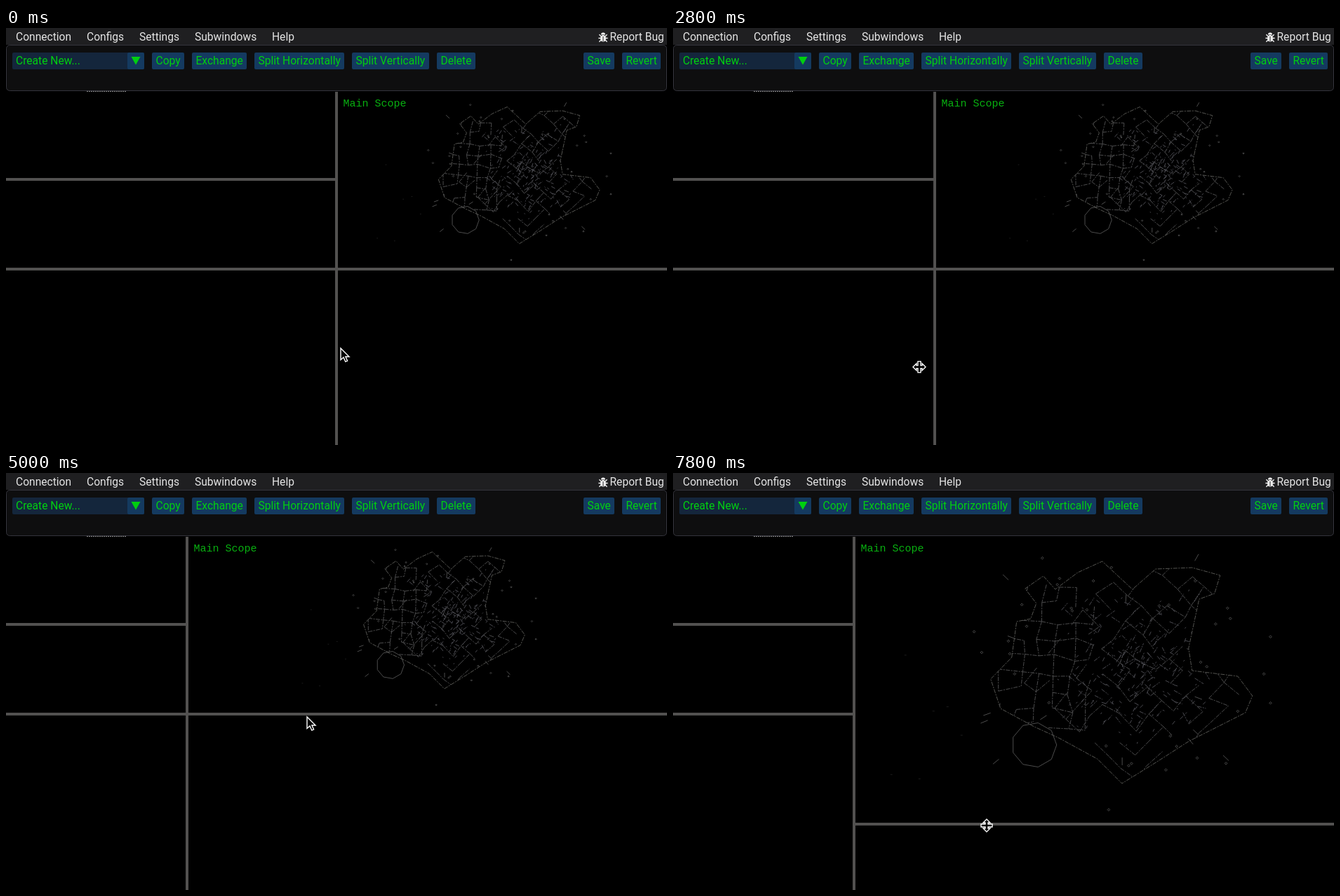
Recreate the animation shown at these times as an HTML page with a canvas. Size 942x595 px, loop 8000 ms.

```html
<!DOCTYPE html>
<html lang="en">
<head>
<meta charset="utf-8">
<title>Split panes</title>
<style>
  html, body { margin: 0; width: 100%; height: 100%; overflow: hidden; background: #000; }
  canvas { display: block; width: 942px; height: 595px; }
</style>
</head>
<body>
<canvas id="stage" width="942" height="595"></canvas>
<script>
const W = 942, H = 595, TOP = 91, LOOP = 8000, STEP = 200;
const ctx = document.getElementById('stage').getContext('2d');
const UI = '15.6px Roboto, sans-serif';
const GREEN = '#00cf10', BAR = '#525150', BUTTON = '#143a60';
const DRAG_X = 2000, DROP_X = 4200, DRAG_Y = 5400;

const clamp = v => Math.min(1, Math.max(0, v));
const ramp = (t, from, to) => clamp((t - from) / (to - from));
const mix = (a, b, p) => a + (b - a) * p;

// Both splitters are dragged at a steady speed
const splitX = t => 471 - 98 * ramp(t, 2170, 2800) - 123.5 * ramp(t, 2800, 3600) + 8 * ramp(t, 3600, DROP_X);
const splitY = t => 344 + 156.5 * ramp(t, 5500, 7800);

// The pointer leads the vertical splitter, crosses over, then rides the horizontal one
function pointer(t) {
  if (t < DRAG_X) {
    const p = ramp(t, 0, 1200), q = ramp(t, 1200, DRAG_X);
    return [477 - 12 * p + 6 * q, 457 + 20 * p + 9 * q];
  }
  if (t < DROP_X) {
    const lead = 22 * ramp(t, DRAG_X, 2400) * (1 - ramp(t, 2800, 3600));
    return [splitX(t) - lead + 2 * ramp(t, 2800, 3600), 486 - 15 * ramp(t, 2650, 3600)];
  }
  const p = ramp(t, DROP_X, 5000);
  if (t < DRAG_Y) return [mix(258, 429, p) + 16 * ramp(t, 5000, DRAG_Y), mix(464, 348, p)];
  return [447, splitY(t) + 2.5];
}

function random(seed) {
  return () => {
    seed = seed + 0x6D2B79F5 | 0;
    let n = Math.imul(seed ^ seed >>> 15, 1 | seed);
    n = n + Math.imul(n ^ n >>> 7, 61 | n) ^ n;
    return ((n ^ n >>> 14) >>> 0) / 4294967296;
  };
}

// Map space: a pane 407.5 high, centred on x = 601
const MAP_X = 601, MAP_H = 407.5, MID_X = 640, MID_Y = 285;
const rnd = random(41);
const spread = size => (rnd() + rnd() - 1) * size;

const outline = new Path2D(
  'M483 263 490 212 510 208 518 186 502 165 528 147 545 166 577 142 612 126 655 166 688 137 740 135 ' +
  '780 146 772 172 750 180 735 250 740 282 805 290 826 318 816 342 735 383 690 412 640 443 605 408 ' +
  '550 378 515 362 467 336 453 294Z');
const streets = new Path2D(), clutter = new Path2D(), marks = new Path2D(), specks = new Path2D();

function segment(path, x, y, angle, length) {
  path.moveTo(x, y);
  path.lineTo(x + Math.cos(angle) * length, y + Math.sin(angle) * length);
}

function polygon(path, x, y, r, sides) {
  for (let i = 0; i < sides; i++) {
    const a = i * 2 * Math.PI / sides;
    path[i ? 'lineTo' : 'moveTo'](x + r * Math.cos(a), y + r * Math.sin(a));
  }
  path.closePath();
}

// A jittered, turned grid of blocks with some street pieces left out
function addGrid(cx, cy, angle, cols, rows, cell, keep) {
  const c = Math.cos(angle), s = Math.sin(angle), above = [];
  for (let j = 0; j < rows; j++) {
    let before = null;
    for (let i = 0; i < cols; i++) {
      const u = (i - (cols - 1) / 2) * cell + spread(7);
      const v = (j - (rows - 1) / 2) * cell + spread(7);
      const node = [cx + u * c - v * s, cy + u * s + v * c];
      for (const other of [before, above[i]]) {
        if (other && rnd() < keep) {
          streets.moveTo(...other);
          streets.lineTo(...node);
        }
      }
      before = above[i] = node;
    }
  }
}
addGrid(533, 262, 0.08, 6, 9, 25, 0.72);
addGrid(690, 285, -0.85, 11, 11, 27, 0.5);

for (let i = 0; i < 260; i++) {
  const angle = (i % 5 < 3 ? -0.9 : 0.65) + spread(0.5);
  segment(clutter, 655 + spread(115), 285 + spread(120), angle, i % 3 ? 4 + rnd() * 11 : 2.5);
}
for (let i = 0; i < 50; i++) {
  const a = rnd() * 2 * Math.PI, r = 0.55 + rnd() * 0.6;
  const x = MID_X + Math.cos(a) * 200 * r, y = MID_Y + Math.sin(a) * 172 * r;
  if (i % 4) polygon(marks, x, y, 1.8, 4);
  else segment(marks, x, y, a, 11);
}
for (let i = 0; i < 6; i++) segment(specks, 310 + i * 20, 250 + rnd() * 190, 0, 3);
polygon(marks, 515, 388, 32, 9);

function rect(x, y, w, h, color) {
  ctx.fillStyle = color;
  ctx.fillRect(x, y, w, h);
}

function label(text, x, y, color, font = UI) {
  ctx.font = font;
  ctx.fillStyle = color;
  ctx.fillText(text, x, y);
}

function textWidth(text) {
  ctx.font = UI;
  return Math.round(ctx.measureText(text).width);
}

function box(x, w, color) {
  ctx.fillStyle = color;
  ctx.beginPath();
  ctx.roundRect(x, 35, w, 24, 2);
  ctx.fill();
}

function drawMap(x, y) {
  const k = (y - 2 - TOP) / MAP_H;
  const draw = (path, color) => { ctx.strokeStyle = color; ctx.stroke(path); };
  ctx.save();
  ctx.beginPath();
  ctx.rect(x + 2, TOP, W - x, y - TOP);
  ctx.clip();
  ctx.translate((x + 2 + W) / 2, TOP);
  ctx.scale(k, k);
  ctx.translate(-MAP_X, -TOP);
  ctx.lineWidth = 1 / k;
  draw(marks, '#4c4c4c');
  draw(specks, '#1c1c1c');
  ctx.setLineDash([6 / k, 1.5 / k, 2 / k, 1.5 / k]);
  draw(outline, '#545450');
  ctx.clip(outline);
  draw(streets, '#4b4b4c');
  draw(clutter, '#4a4a50');
  ctx.restore();
}

function drawPanes(x, y) {
  const left = Math.round(x - 2), low = Math.round(y - 2);
  drawMap(x, y);
  rect(0, 214, left, 4, BAR);
  rect(0, 342, left, 4, BAR);
  rect(left + 4, low, W, 4, BAR);
  rect(left, TOP, 4, H - TOP, BAR);
  label('Main Scope', left + 11.5, 112, '#08b010', '15px "Liberation Mono", monospace');
}

function drawBug() {
  ctx.save();
  ctx.translate(851, 13);
  ctx.fillStyle = ctx.strokeStyle = '#f0f0f0';
  ctx.lineWidth = 1.4;
  ctx.beginPath();
  ctx.arc(0, -3.4, 3.1, Math.PI, 0);
  ctx.fill();
  ctx.beginPath();
  ctx.ellipse(0, 1.8, 4, 4.8, 0, 0, 7);
  ctx.fill();
  ctx.beginPath();
  for (const side of [-1, 1]) {
    for (const row of [-1, 0, 1]) {
      ctx.moveTo(side * 3, 1.5 + row * 2.5);
      ctx.lineTo(side * (6.6 - Math.abs(row)), 1.5 + row * 5.2);
    }
  }
  ctx.stroke();
  rect(-0.5, -1, 1, 7, '#202022');
  ctx.restore();
}

function drawMenu() {
  rect(0, 0, W, 24, '#1f1f21');
  let x = 14;
  for (const name of ['Connection', 'Configs', 'Settings', 'Subwindows', 'Help']) {
    label(name, x, 18, '#e4e4e4');
    x += textWidth(name) + 22;
  }
  label('Report Bug', 860.5, 18, '#e4e4e4');
  drawBug();
}

function button(name, x) {
  const w = textWidth(name) + 11;
  box(x, w, BUTTON);
  label(name, x + 5.5, 52, GREEN);
  return w + 11;
}

function drawToolbar() {
  ctx.beginPath();
  ctx.roundRect(0.5, 24.5, W - 1, 65, 5);
  ctx.fillStyle = '#0e0e0f';
  ctx.fill();
  ctx.strokeStyle = '#34343c';
  ctx.lineWidth = 1;
  ctx.stroke();

  box(9, 188, '#14263c');
  box(173, 24, BUTTON);
  label('Create New...', 14, 52, GREEN);
  ctx.beginPath();
  ctx.moveTo(178.5, 41);
  ctx.lineTo(191.5, 41);
  ctx.lineTo(185, 52.5);
  ctx.fill();

  let x = 208;
  for (const name of ['Copy', 'Exchange', 'Split Horizontally', 'Split Vertically', 'Delete']) {
    x += button(name, x);
  }
  x = 944;
  for (const name of ['Revert', 'Save']) {
    x -= textWidth(name) + 22;
    button(name, x);
  }

  // Tips of a caption hidden behind the toolbar
  for (let tip = 115; tip < 171; tip += 3) rect(tip, 90, 2, 1, '#8a8a8a');
}

const arrow = new Path2D('M0 0V16.5L4 13 6.8 19.2 9.6 18 6.9 12H12Z');
const resize = new Path2D('M-9 0-4-5V-2H-2V-8H2V-2H4V-5L9 0 4 5V2H2V8H-2V2H-4V5Z');

function drawPointer(t) {
  const wide = t >= DRAG_X && t < DROP_X, tall = t >= DRAG_Y;
  const shape = wide || tall ? resize : arrow;
  ctx.save();
  ctx.translate(...pointer(t));
  if (tall) ctx.rotate(Math.PI / 2);
  ctx.fillStyle = '#000';
  ctx.strokeStyle = '#fff';
  ctx.lineWidth = 1.4;
  ctx.fill(shape);
  ctx.stroke(shape);
  ctx.restore();
}

function frame() {
  const t = Math.floor(performance.now() % LOOP / STEP) * STEP;
  rect(0, 0, W, H, '#000');
  drawPanes(splitX(t), splitY(t));
  rect(0, 0, W, TOP, '#000');
  drawMenu();
  drawToolbar();
  drawPointer(t);
  requestAnimationFrame(frame);
}
frame();
</script>
</body>
</html>
```
